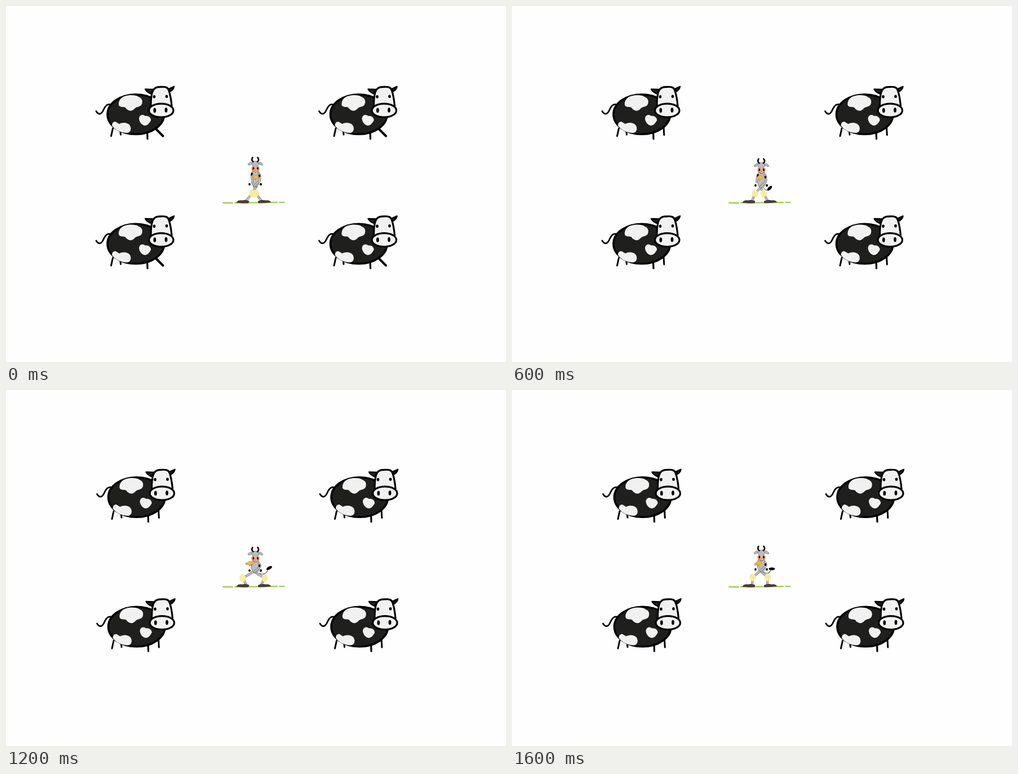
Write an HTML page with a canvas that moves like this. It is 887 px wide and 631 px high and loops after 1.8 s.

```html
<!DOCTYPE html>
<html lang="en">
<head>
<meta charset="utf-8">
<title>Dancing cows</title>
<style>
html, body { margin: 0; width: 100%; height: 100%; overflow: hidden; background: #fefefe; }
canvas { display: block; }
</style>
</head>
<body>
<canvas id="stage" width="887" height="631"></canvas>
<script>
const ctx = document.getElementById('stage').getContext('2d');
const STEP = 200, STEPS = 9;
const BLACK = '#000', COAT = '#1f1f1e', WHITE = '#f1f1f1', GREY = '#bcbcbc', EDGE = '#6e6e6e';
ctx.lineCap = ctx.lineJoin = 'round';

function paint(path, fill, stroke, width) {
  if (fill) { ctx.fillStyle = fill; ctx.fill(path); }
  if (stroke) { ctx.strokeStyle = stroke; ctx.lineWidth = width; ctx.stroke(path); }
}
const shape = (d, fill, stroke, width) => paint(new Path2D(d), fill, stroke, width);
const line = (d, color, width) => shape(d, null, color, width);
function oval(x, y, rx, ry, fill, stroke, width, turn = 0) {
  const path = new Path2D();
  path.ellipse(x, y, rx, ry, turn, 0, 7);
  paint(path, fill, stroke, width);
}

function cow(x, y, frontOut, backOut) {
  ctx.save();
  ctx.translate(x, y);
  // tail and legs
  line('M160 186.500C164 193 169 193 173 184S181 173 187 175', BLACK, 2.8);
  line(backOut ? 'M192 217L177 222.5' : 'M189.500 217L186.500 230.500', BLACK, 3);
  line('M203 224L203.500 228', BLACK, 3);
  line(backOut ? 'M252 222L237 234' : 'M250.500 221L251 235.500', BLACK, 3.2);
  if (frontOut) line('M264 216L278.500 230.500', BLACK, 4);
  else line('M269 214L269.800 228.500', BLACK, 3);
  // body with patches
  oval(230.300, 192, 50.300, 35.300, COAT, BLACK, 3.6);
  shape('M200 172C201 165 206 160 216 158.500C224 157.500 231 158 235 161C241 163 243 168 241 174C239 179 233 178 229 181C225 186 220 187 216 184C212 182 213 179 208 179C203 179 199 178 200 172Z', WHITE);
  shape('M194 205C197 206 198 208 201 209C206 206 216 206 220 212C223 218 221 224 215 225C204 225 194 220 188 212C188 208 190 205 194 205Z', WHITE);
  shape('M236 200C236 193 243 191 247 195C253 194 258 199 257 203C254 208 251 212 246 212C240 210 237 206 236 200Z', WHITE);
  // head
  shape('M247 147.500L262 148L257 155.500Q250 153 247 147.500Z', COAT, BLACK, 2.5);
  shape('M288 147.500L298 142.800Q297 149 290 152Z', COAT, BLACK, 2.5);
  shape('M257 177C257 164 258 153 262 148C265 143.500 270 143.500 276 143.300C283 143 287 144 289 150C291 156 293 166 294 177Z', WHITE, BLACK, 3.2);
  oval(275.300, 185.200, 21.700, 12, WHITE, BLACK, 3.2);
  oval(263, 160.800, 2.300, 2.800, BLACK);
  oval(285, 160.300, 2.300, 2.800, BLACK);
  oval(263.800, 185, 2.400, 4.200, BLACK);
  oval(284, 184.500, 2.400, 4.200, BLACK);
  ctx.restore();
}

// Dancer poses by step: head top, hip, knees (left, right, y), tail tip and turn, bell
const poses = {
  0: [267, 320, 437, 443, 332, 446, 318, 0, 443, 303],
  3: [269.5, 322, 431.5, 446.5, 332, 457, 323, -0.8, 440, 304],
  4: [272, 322, 425.5, 453.5, 332, 461, 318, -1.3, 437, 306],
  5: [272, 322, 425.5, 453.5, 332, 461, 318, -1.3, 437, 306],
  6: [277.5, 324, 420, 459, 333.5, 467, 315.5, -0.5, 433, 307],
  8: [275.5, 322, 427, 453.5, 332, 461, 317, 0, 438, 307],
};
function poseAt(step) {
  const keys = Object.keys(poses).map(Number);
  const a = keys.filter(k => k <= step).pop(), b = keys.find(k => k >= step);
  const f = a === b ? 0 : (step - a) / (b - a);
  return poses[a].map((v, i) => v + (poses[b][i] - v) * f);
}

function limb(d) {
  line(d, EDGE, 4);
  line(d, GREY, 2.8);
}

function dancer([top, hip, kneeL, kneeR, kneeY, tailX, tailY, tailTurn, bellX, bellY]) {
  // ground
  line('M385 348.800L402 349.200M406 349L481 348.200M485 348L493.500 348', '#97cc4b', 2.2);
  // tail
  line(`M446 ${hip}Q${tailX - 6} ${hip + 7} ${tailX - 2} ${tailY + 2}`, EDGE, 1.2);
  const size = Math.min(1, (tailX - 446) / 11);
  oval(tailX, tailY, 5.5 * size, 2.6 * size, BLACK, null, 0, tailTurn);
  // legs, socks and shoes
  limb(`M440 ${hip - 2}L${kneeR} ${kneeY}L453 345`);
  limb(`M446 ${hip - 6}L${kneeL} ${kneeY}L426 345`);
  for (const x of [kneeL, kneeR]) {
    oval(x, kneeY, 5, 6.3, '#f8f2ad', '#eee078', .9);
    line(`M${x - 2} ${kneeY - 4}l1 7M${x + 2} ${kneeY - 3}l-1 7`, '#eadb6e', .8);
  }
  shape('M409.500 348Q411 344 419 345Q425 343 431 346L430 349Q419 350 409.500 348Z', '#563d39', '#34211f', .8);
  shape('M469.500 347.500Q467 344 461 345Q454 343 447.500 346L448 349Q460 349 469.500 347.500Z', '#563d39', '#34211f', .8);
  // body and arms
  const neck = top + 25;
  shape(`M437 ${neck}Q433 ${neck + 9} 437 ${hip - 3}Q442 ${hip + 4} 448 ${hip - 3}Q452 ${neck + 9} 448 ${neck}Z`, GREY, EDGE, .8);
  limb(`M436 ${neck + 5}L${bellX - 6} ${Math.max(bellY + 1, hip - 7 - (443 - bellX) * 1.2)}`);
  limb(`M449 ${neck + 5}Q453 ${hip - 12} 448 ${hip - 8}L441 ${hip - 2}`);
  oval(436, neck + 6, 1.5, 2.8, BLACK, null, 0, .4);
  oval(449.500, neck + 9, 1.7, 2.4, BLACK);
  oval(432, hip - 4, 1.8, 2.2, BLACK);
  oval(452, hip - 4, 2, 2.2, BLACK);
  oval(bellX, bellY, 5, 3.5, '#eeb83f', '#d89a2e', .8);
  oval(bellX - 1, bellY + 4, 1.2, 1, '#c88328');
  // head
  oval(433, top + 12.500, 4, 2.1, GREY, EDGE, .7, -.5);
  oval(452, top + 12.500, 4, 2.1, GREY, EDGE, .7, .5);
  oval(442.300, top + 13, 6.5, 5, GREY, EDGE, .7);
  oval(442.500, top + 21, 6.8, 5.5, '#f5925f', '#d87c53', .6);
  oval(442.500, top + 17, 3, 4, GREY);
  oval(439, top + 21, 1.3, 2.4, BLACK);
  oval(446.500, top + 21, 1.3, 2.4, BLACK);
  oval(442.500, top + 25, 3.8, 3, '#fff');
  oval(442.500, top + 24, 2.5, 2, '#ee9142');
  line(`M439 ${top + 25}Q442.500 ${top + 30} 446.500 ${top + 25}`, '#453832', 1.2);
  line(`M437.500 ${top + 1.500}Q434.500 ${top + 6} 438.500 ${top + 9}`, BLACK, 2.6);
  line(`M446.500 ${top + 1.500}Q450 ${top + 6} 446 ${top + 9}`, BLACK, 2.6);
}

function draw() {
  const step = Math.floor(performance.now() / STEP) % STEPS;
  const [dx, dy] = step < 4 ? [0, 0] : step === 4 ? [2, -6.5] : [1.5, -2];
  ctx.fillStyle = '#fefefe';
  ctx.fillRect(0, 0, 887, 631);
  for (const x of [0, 395.5])
    for (const y of [0, 229.5])
      cow(x + dx, y + dy, step === 0 || step === 2, step === 5 || step === 7);
  dancer(poseAt(step));
  requestAnimationFrame(draw);
}
draw();
</script>
</body>
</html>
```
